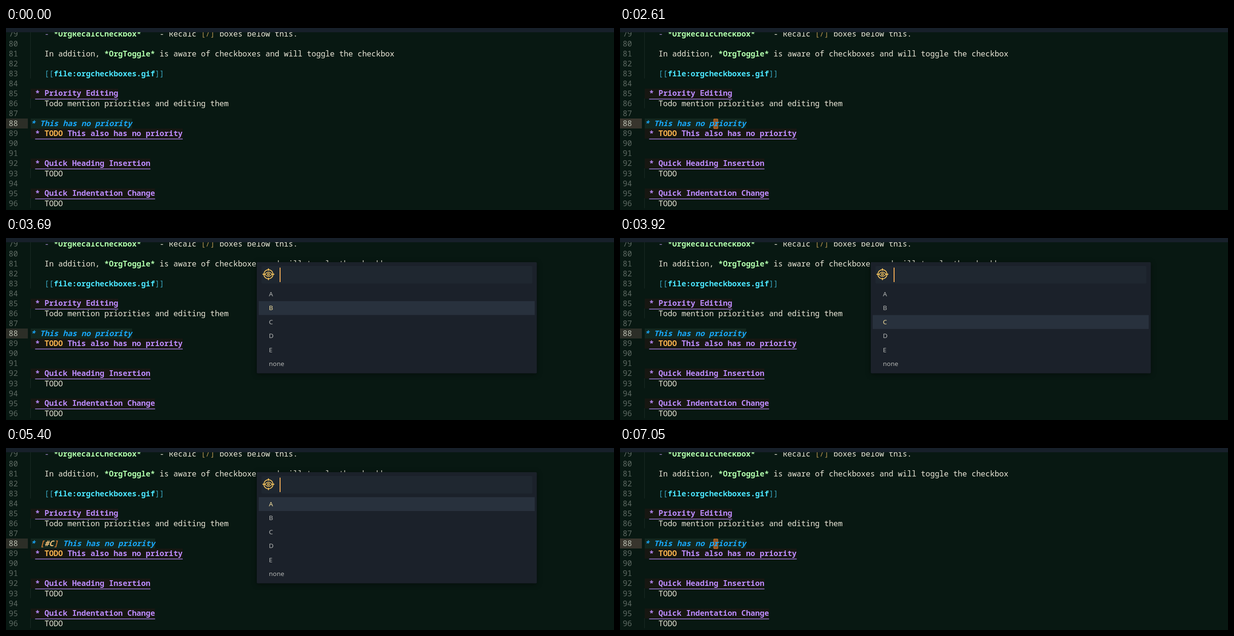
These frames come from a looping animation (1280x384 px, 8 s). An HTML page:

```html
<!DOCTYPE html>
<html lang="en">
<head>
<meta charset="utf-8">
<title>Priority editing</title>
<style>
html, body { margin: 0; width: 100%; height: 100%; overflow: hidden; background: #081812; }
svg { display: block; width: 1280px; height: 384px; }
text { white-space: pre; }
.code { font: 300 16.17px "Noto Sans Mono", "DejaVu Sans Mono", monospace; fill: #ece9da; }
.num { fill: #5e6a63; }
.on { fill: #bcbfb2; }
.bold, .head, .todo, .cmd, .link, .cur { font-weight: 700; }
.head { fill: #bd8cff; }
.todo { fill: #f5b04c; }
.cmd { fill: #b2ffae; }
.link { fill: #4be6ff; }
.bracket { fill: #38a3bd; }
.count { fill: #b0924f; }
.dash { fill: #a888d0; }
.cur { fill: #18a8fb; font-style: italic; }
.mark { fill: #cd7630; }
.prio { fill: #ffca80; }
#popup { filter: drop-shadow(0 2px 6px rgba(0, 0, 0, .45)); }
.item { font: 13.4px "Noto Sans", sans-serif; fill: #b3b5b3; }
.picked { fill: #f7e2a0; }
.query { font: 18px "Noto Sans", sans-serif; fill: #ffd580; }
</style>
</head>
<body>
<svg viewBox="0 0 1280 384">
  <g id="page"></g>
  <g id="line"></g>
  <rect width="1280" height="9" fill="#17202a"/>
  <g id="popup">
    <rect id="panel" x="528" y="51" width="589.5" rx="2" fill="#1b212a"/>
    <rect x="538" y="59" width="570" height="37" rx="2" fill="#1f2730"/>
    <g fill="none" stroke="#f5c45e" stroke-width="1.8">
      <circle cx="552.5" cy="76.5" r="9.6"/>
      <path d="M552.5 64v5M552.5 84v5M540 76.5h5M560 76.5h5"/>
      <path d="M545 76.5q7.5 -9 15 0q-7.5 9 -15 0z" stroke-width="1.5"/>
      <circle cx="552.5" cy="76.5" r="2" stroke-width="1.6"/>
    </g>
    <g id="list"></g>
  </g>
  <path id="mouse" d="M1 .8h3.2l1.3 1l1.3-1H10M5.5 1.8v14.4M1 17.2h3.2l1.3-1l1.3 1H10" fill="none" stroke="#e4e6e2" stroke-width="1.2"/>
</svg>
<script>
const LOOP = 8000, CHAR = 9.702, LEFT = 42.2;
const $ = id => document.getElementById(id);
const col = n => LEFT + n * CHAR;
const mid = row => 201.2 + (row - 88) * 21.06;
const span = (cls, s) => `<tspan class="${cls}">${s}</tspan>`;
const rect = (x, y, w, h, fill, more = '') =>
  `<rect x="${x}" y="${y}" width="${w}" height="${h}" fill="${fill}" ${more}/>`;
const text = (x, y, cls, s) => `<text x="${x}" y="${y}" class="${cls}">${s}</text>`;
const code = (row, c, s, rise = 0) => text(col(c), mid(row) + 6 - rise, 'code', s);
const number = (row, cls) => text(5.8, mid(row) + 6, 'code ' + cls, row);
const guide = (from, to) =>
  rect(51, mid(from) - 10.5, 1, (to - from + 1) * 21.06, '#1b2a25');

function heading(row, title, todo = '') {
  const end = col(4 + todo.length + title.length), y = mid(row);
  return rect(52, y - 10, end - 52, 21, '#171712')
    + rect(61.3, y + 11.3, end - 61.3, 1.3, '#bd8cff')
    + code(row, 2, span('head', '* ') + span('todo', todo) + span('head', title), .7);
}

let page = guide(79, 83) + guide(86, 86) + guide(93, 93) + guide(96, 96);
for (let row = 79; row <= 96; row++) if (row !== 88) page += number(row, 'num');
page += code(79, 4, span('dash', '- ') + span('cmd', '*OrgRecalcCheckbox*')
  + '    - Recalc ' + span('count', '[/]') + ' boxes below this.');
page += code(81, 4, 'In addition, ' + span('cmd', '*OrgToggle*')
  + ' is aware of checkboxes and will toggle the checkbox');
page += code(83, 4, span('bracket', '[[') + span('link', 'file:orgcheckboxes.gif')
  + span('bracket', ']]'));
page += heading(85, 'Priority Editing');
page += code(86, 4, 'Todo mention priorities and editing them');
page += heading(89, 'This also has no priority', 'TODO ');
page += heading(92, 'Quick Heading Insertion') + code(93, 4, 'TODO');
page += heading(95, 'Quick Indentation Change') + code(96, 4, 'TODO');
$('page').innerHTML = page;

// Active line: optional priority cookie, block caret while focused.
function activeLine(prio, focused) {
  const shift = prio ? 5 : 0, y = mid(88);
  const cookie = prio
    ? span('mark', '[') + span('prio', '#C') + span('mark', ']') + ' ' : '';
  const caret = focused
    ? rect(col(16 + shift) - .1, y - 9.2, 8.6, 20.2, '#96501c',
      'stroke="#dc8234" stroke-width="1" rx=".5"') : '';
  return rect(0, y - 10.2, 46, 21, focused ? '#38352d' : '#2c2e27')
    + rect(52, y - 10.2, (22 + shift) * CHAR, 21, '#13271f')
    + number(88, 'on') + caret
    + code(88, 1, span('cur', '* ' + cookie + 'This has no priority'), .7);
}

function popupList(items, picked, query) {
  const caretX = query ? 587 : 576;
  return (query ? text(576, 87.5, 'query', query) : '')
    + rect(caretX, 62.5, 2, 30.5, '#f2aa54')
    + items.map((s, i) => {
      const y = 103.7 + i * 29.45;
      return (i === picked ? rect(532, y, 581, 29.3, '#28313d') : '')
        + text(553.5, y + 19, i === picked ? 'item picked' : 'item', s);
    }).join('');
}

// Pointer stops: time, x, y; null position means hidden.
const stops = [
  [210, 700, 266], [280, 650, 276], [440, 535, 246], [510, 425, 214],
  [820, 416, 221], [897, 390, 228], [974, 350, 226], [1051, 308, 219],
  [1128, 266, 210], [1205, 234, 201], [1282, 212, 195], [1360, 202, 192],
  [1510, 200, 197], [1600, 197, 200], [1690, 196, 198], [2610, null]
];
const priorities = ['A', 'B', 'C', 'D', 'E', 'none'];
const between = (t, a, b) => t >= a && t < b;
let shown = '';

function draw(now) {
  const t = now % LOOP;
  const first = between(t, 2760, 4240), second = between(t, 5400, 6970);
  const open = first || second;
  const typed = second && t >= 6580;
  const prio = between(t, 4240, 7050);
  const focused = t >= 1600 && !open;
  const picked = first ? (t >= 3690) + (t >= 3920) : 0;
  const stop = stops.filter(s => s[0] <= t).pop();

  const key = [open, typed, prio, focused, picked, stop].join();
  if (key !== shown) {
    shown = key;
    $('line').innerHTML = activeLine(prio, focused);
    $('popup').style.display = open ? '' : 'none';
    $('panel').setAttribute('height', typed ? 87 : 234.5);
    $('list').innerHTML = popupList(typed ? ['none'] : priorities, picked, typed ? 'n' : '');
    const visible = stop && stop[1] !== null;
    $('mouse').style.display = visible ? '' : 'none';
    if (visible) $('mouse').setAttribute('transform', `translate(${stop[1]} ${stop[2]})`);
  }
}

const start = performance.now();
function tick() {
  draw(performance.now() - start);
  requestAnimationFrame(tick);
}
tick();
</script>
</body>
</html>
```
